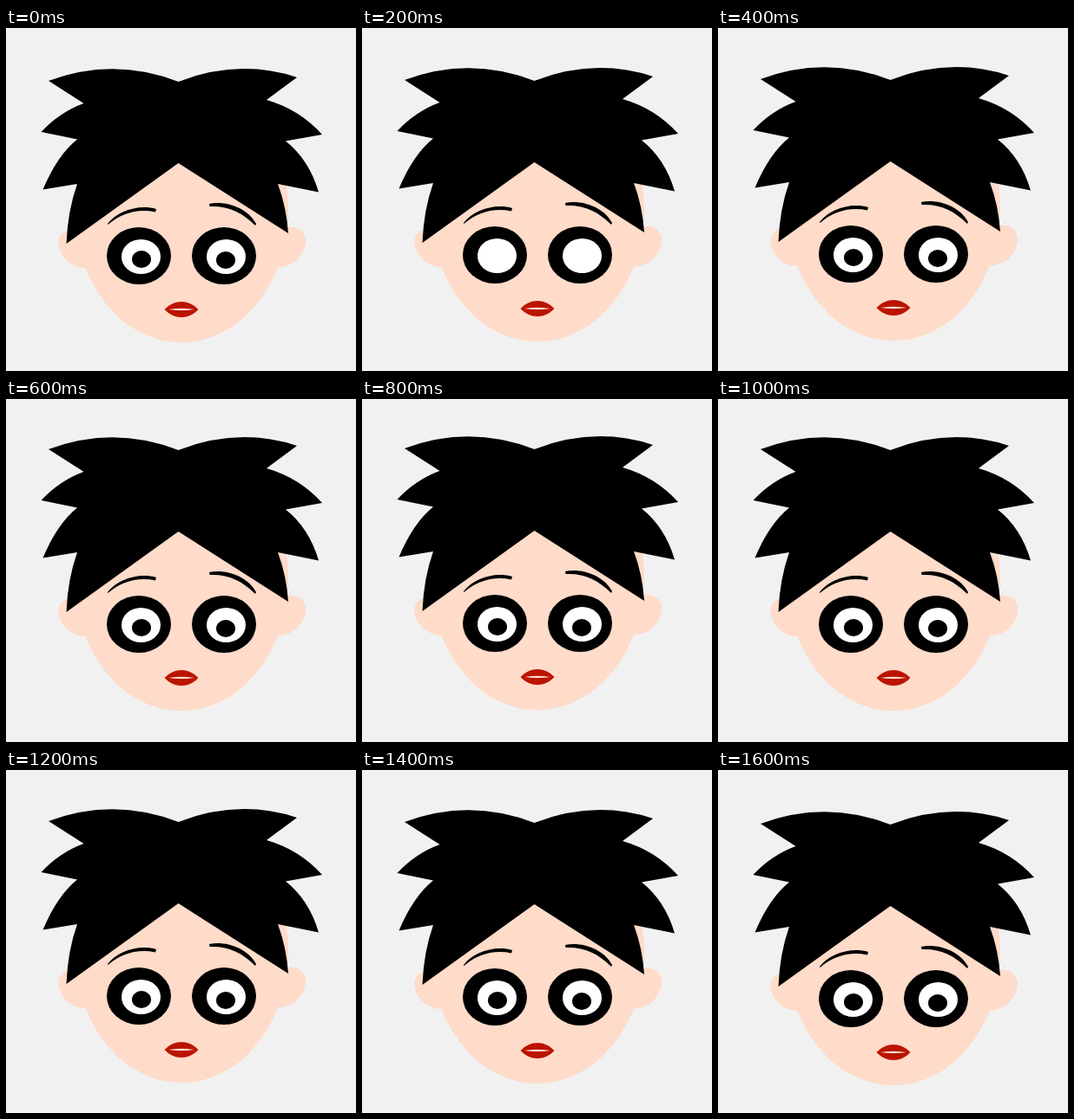
An HTML page that plays this animation: 403 by 396 pixels, repeating every 1800 ms.

```html
<!DOCTYPE html>
<html lang="en">
<head>
<meta charset="utf-8">
<title>Blinking face</title>
<style>
  html, body { margin: 0; width: 100%; height: 100%; overflow: hidden; background: #f1f1f1; }
  svg { display: block; }
  .skin { fill: #ffdbc9; }
</style>
</head>
<body>
<svg width="403" height="396" viewBox="0 0 403 396">
  <g id="head">
    <g class="skin">
      <path d="M70 234C62 237 59 245 61 252C64 268 79 278 95 277L110 240Z"/>
      <path d="M324 230C338 228 346 238 345 247C343 265 328 278 309 276L300 240Z"/>
      <path d="M322.6 180A123 153 0 1 1 81.4 180L198 140Z"/>
    </g>
    <path id="hair" d="M198.500 62Q268 35 335 57L300 83Q338 94 364 123L322 130.500Q349 152 360 189.500L313 180Q323 207 325 237L198.500 156L69.500 249Q71 211 82 180L42.500 186.500Q59 147 82 128.500L40.500 120Q62 97 89.500 87L49 61Q124 33 198.500 62Z"/>
    <path d="M117 226C128 212 152 203 173 209L172 212.500C152 208 132 214 117.500 227Z"/>
    <path d="M234 203C252 199 278 207 288 226L287 228C272 213 256 205 234.500 206Z"/>
    <ellipse cx="153" cy="263" rx="37" ry="33"/>
    <ellipse cx="251" cy="263" rx="37" ry="33"/>
    <g fill="#fff">
      <ellipse cx="155.500" cy="264" rx="22.500" ry="20"/>
      <ellipse cx="253.500" cy="264" rx="22.500" ry="20"/>
    </g>
    <g id="pupils">
      <ellipse cx="156" cy="267" rx="11" ry="10"/>
      <ellipse cx="253" cy="268" rx="11" ry="10"/>
    </g>
    <path fill="#bb1400" d="M182.500 325C194 313 210 313 221.500 325C210 337 194 337 182.500 325Z"/>
    <path fill="#ffe4d8" d="M187 325Q202 322.500 217 325Q202 327 187 325Z"/>
  </g>
</svg>
<script>
  const STEP = 200;
  const BLINK = 1;
  const bob = [0, -1, -2, -3, -4, -3, -2, -1, 1];
  const head = document.getElementById('head');
  const pupils = document.getElementById('pupils');

  function draw() {
    const step = Math.floor(performance.now() / STEP) % bob.length;
    head.setAttribute('transform', `translate(0 ${bob[step]})`);
    pupils.setAttribute('visibility', step === BLINK ? 'hidden' : 'visible');
    requestAnimationFrame(draw);
  }
  draw();
</script>
</body>
</html>
```
